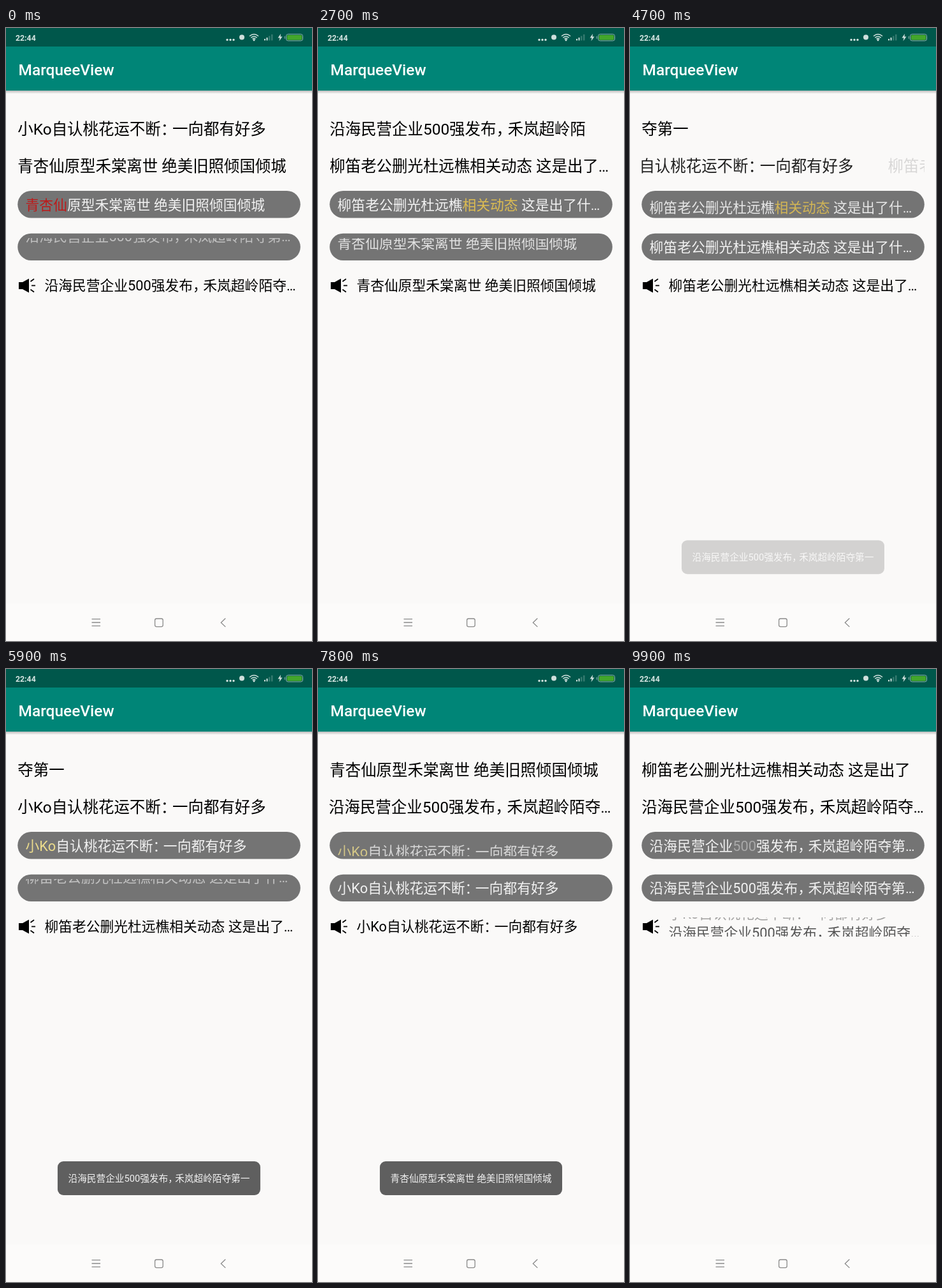
Recreate the animation shown at these times as an HTML page. Size 480 px wide and 960 px high, loop 10000 ms.

```html
<!DOCTYPE html>
<html lang="zh-CN">
<head>
<meta charset="utf-8">
<title>MarqueeView</title>
<style>
html, body { margin: 0; width: 100%; height: 100%; overflow: hidden; background: #faf9f8; }
body { font-family: Roboto, "Noto Sans CJK SC", "Noto Sans CJK", sans-serif; }
svg, .row, .row div, .toast { position: absolute; }
svg { left: 0; top: 0; }
.row { overflow: hidden; }
.row div { inset: 0; white-space: pre; }
i { font-style: normal; letter-spacing: -.25em; }
.toast {
  left: 50%; top: 771px; height: 53px; padding: 0 16.6px; border-radius: 9px;
  background: #5f5f5f; color: #f2f2f2; font-size: 14.67px; line-height: 54px; white-space: pre;
}
</style>
</head>
<body>
<svg width="480" height="960" fill="none">
  <defs>
    <linearGradient id="shade" x2="0" y2="1">
      <stop stop-color="#000" stop-opacity=".25"/>
      <stop offset="1" stop-color="#000" stop-opacity="0"/>
    </linearGradient>
  </defs>
  <path fill="#00574b" d="M0 0h480v29H0z"/>
  <path fill="#008577" d="M0 29h480v69H0z"/>
  <path fill="url(#shade)" d="M0 98h480v5H0z"/>
  <path fill="#fcfbfa" d="M0 901h480v59H0z"/>
  <text x="15" y="19.5" font-size="12.3" font-weight="600" fill="#d5e4e1">22:44</text>
  <text x="19.6" y="73.6" font-size="24.44" font-weight="500" fill="#fff">MarqueeView</text>

  <g fill="#cfdfdc">
    <circle cx="347" cy="18.5" r="1.7"/><circle cx="352" cy="18.5" r="1.7"/><circle cx="357" cy="18.5" r="1.7"/>
    <circle cx="370" cy="14.5" r="4"/>
    <circle cx="389" cy="18.8" r="1.6"/>
    <path d="M405 17h2v2.500h-2zM408.500 15h2v4.500h-2zM431 9l-4.500 6.500h3l-1 5 5-7h-3z"/>
    <path opacity=".25" d="M412 12.500h2.500v7H412zM416 10h2.500v9.500H416z"/>
  </g>
  <g stroke="#cfdfdc" stroke-width="1.5">
    <path d="M382 12.800q7-6 14 0M384.300 15.200q4.700-4 9.400 0M386.600 17.300q2.400-2 4.800 0"/>
    <g stroke="#8fb3ac" stroke-width="1">
      <rect x="439.500" y="9.700" width="26" height="10.300" rx="3"/>
      <path d="M437.200 12.800v4"/>
    </g>
  </g>
  <rect x="440.700" y="10.900" width="23.600" height="7.900" rx="2" fill="#43a62b"/>

  <g fill="#747474">
    <rect x="18.300" y="255" width="443.500" height="42.500" rx="21.200"/>
    <rect x="18.300" y="321.700" width="443.500" height="42.300" rx="21.100"/>
  </g>
  <path fill="#000" d="M20 398h6l10-5.500v22l-10-5.500h-6z"/>
  <path stroke="#000" stroke-width="1.800" d="M38.500 397l5.500-4M40 403.300h6M38.500 409.500l5.500 4"/>

  <g stroke="#8a8a8a" stroke-width="1.300">
    <path d="M134.500 925.700h13.500M134.500 931h13.500M134.500 936.400h13.500M344.300 924.500l-7 6.700 7 6.700"/>
    <rect x="233.600" y="925" width="12.600" height="12.600" rx="2.500"/>
  </g>
</svg>
<script>
const LOOP = 10000, STEP = 100;
const firms = "沿海民营企业500强发布，禾岚超岭陌夺第一";
const film = "青杏仙原型禾棠离世 绝美旧照倾国倾城";
const posts = "柳笛老公删光杜远樵相关动态 这是出了什么事";
const star = "小Ko自认桃花运不断：一向都有好多";
const tints = { "500": "#a9a9a9", "青杏仙": "#bd1a1a", "相关动态": "#dcbc52", "小Ko": "#ecdc8c" };

const cut = (s, n) => s.slice(0, n) + "…";
const punct = s => s.replace(/[，：]/g, "<i>$&</i>");
const tint = s => s.replace(/500|青杏仙|相关动态|小Ko/, k => `<span style="color:${tints[k]}">${k}</span>`);
const ease = p => .5 - Math.cos(Math.PI * Math.min(1, Math.max(0, p))) / 2;

function add(parent, name = "") {
  const el = document.createElement("div");
  el.className = name;
  return parent.appendChild(el);
}

function setHtml(el, html) {
  if (el.source !== html) el.innerHTML = el.source = html;
}

// dx, dy: travel of one change; starts: when each change begins
const rows = [
  { x: 18.3, mid: 159, h: 34, size: 24.44, dx: 0, dy: -34, dur: 500, starts: [200, 3200, 6200, 9200],
    items: [star, firms.slice(0, 18), firms.slice(18), film, posts.slice(0, 18)] },
  { x: 18.3, mid: 216.7, h: 34, size: 24.44, dx: 443.5, dy: 0, dur: 500, starts: [1317, 4317, 7317],
    items: [film, cut(posts, 18), star, cut(firms, 19)] },
  { x: 30.6, mid: 277.8, h: 30, size: 21.78, dx: 0, dy: 42.5, dur: 1000, starts: [1500, 4500, 7500],
    color: "#f2f2f2", items: [film, cut(posts, 19), star, cut(firms, 20)].map(tint) },
  { x: 30.6, mid: 344.2, h: 30, size: 21.78, dx: 0, dy: -44, dur: 1000, starts: [-430, 2465, 5480, 8500],
    color: "#f2f2f2", items: [cut(firms, 20), film, cut(posts, 19), star, cut(firms, 20)] },
  { x: 60.4, mid: 404.2, h: 30, size: 21.78, dx: 0, dy: -30, dur: 1000, starts: [300, 3300, 6300, 9300],
    items: [cut(firms, 19), film, cut(posts, 18), star, cut(firms, 19)] },
];

for (const r of rows) {
  const box = add(document.body, "row");
  box.style.cssText = `left:${r.x}px;top:${r.mid - r.h / 2}px;width:${461.8 - r.x}px;height:${r.h}px;` +
    `font-size:${r.size}px;line-height:${r.h}px;color:${r.color || "#000"}`;
  r.items = r.items.map(punct);
  r.out = add(box);
  r.in = add(box);
}

const toasts = [[firms, 4638], [film, 7300]].map(([text, start]) => {
  const el = add(document.body, "toast");
  el.innerHTML = punct(text);
  return { el, start, end: start + 2100 };
});

function place(el, x, y, alpha) {
  el.style.transform = `translate(${x}px,${y}px)`;
  el.style.opacity = alpha;
}

function draw(t) {
  for (const r of rows) {
    const k = Math.max(0, r.starts.filter(s => s <= t).length - 1);
    const p = ease((t - r.starts[k]) / r.dur);
    setHtml(r.out, r.items[k]);
    setHtml(r.in, r.items[k + 1]);
    place(r.out, r.dx * p, r.dy * p, 1 - p);
    place(r.in, r.dx * (p - 1), r.dy * (p - 1), p);
  }
  for (const { el, start, end } of toasts) {
    const a = Math.max(0, Math.min(1, (t - start) / 250, (end - t) / 250));
    el.style.transform = `translate(-50%,${41.5 * (1 - a)}px)`;
    el.style.opacity = a;
  }
}

const origin = performance.now();
function tick() {
  const t = (performance.now() - origin) % LOOP;
  draw(Math.floor(t / STEP) * STEP);
  requestAnimationFrame(tick);
}
tick();
</script>
</body>
</html>
```
